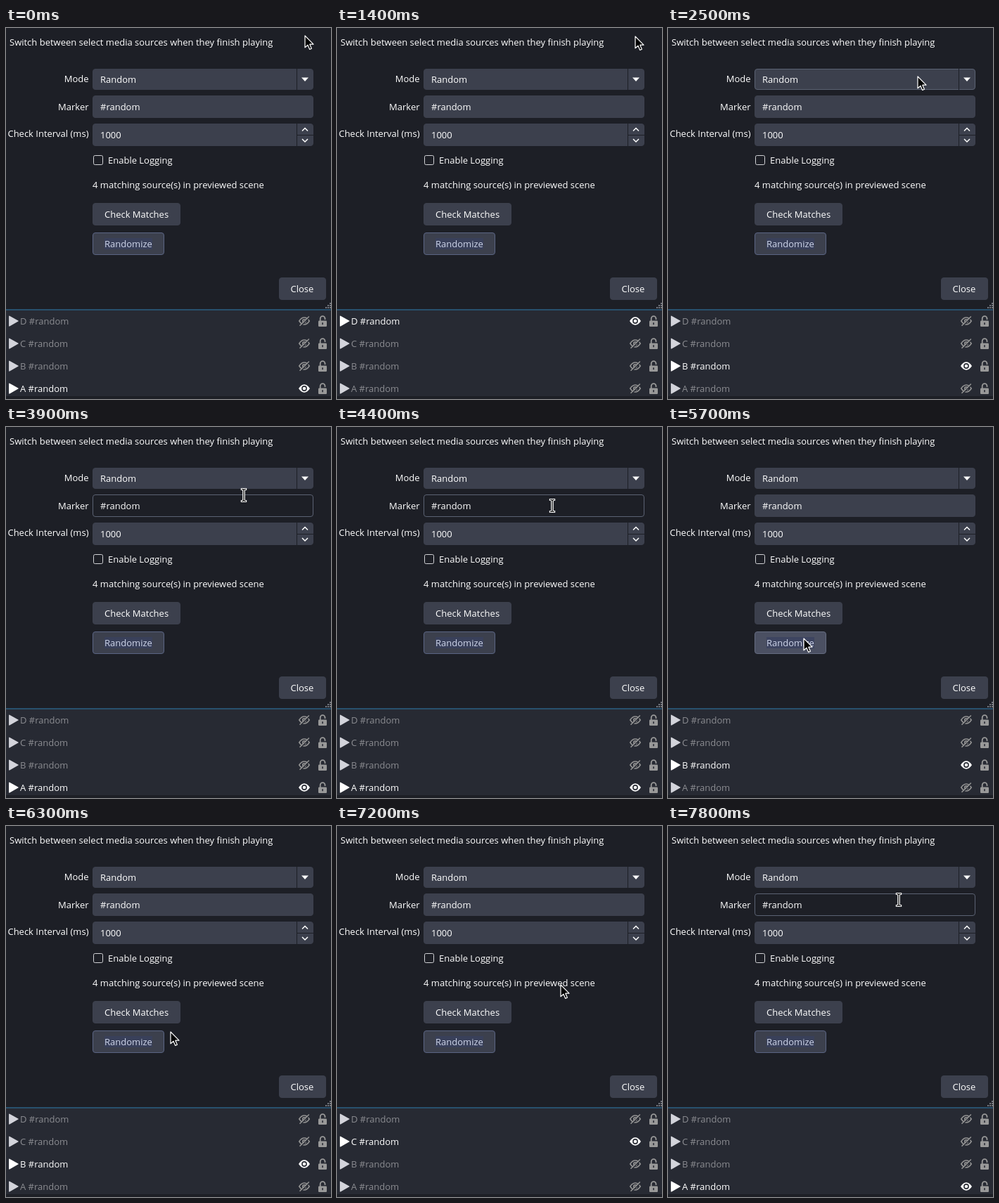
An HTML page that plays this animation: 462x528 px, repeating every 8000 ms.

```html
<!DOCTYPE html>
<html lang="en">
<head>
<meta charset="utf-8">
<title>Media switcher</title>
<style>
html, body { margin: 0; width: 100%; height: 100%; overflow: hidden; background: #1d1f26; }
svg { display: block; width: 462px; height: 528px; }
text { font: 13px "Open Sans", "Noto Sans", sans-serif; fill: #fefefe; white-space: pre; }
.box { fill: #3c404d; stroke: #3c404d; }
.combo.hover { stroke: #5b6273; }
.edit.hover { fill: #1d1f26; stroke: #5b6273; }
.btn.focus { stroke: #5b6584; }
.btn.hover { fill: #4b5062; stroke: #656c80; }
.line { fill: none; stroke: #fefefe; stroke-width: 1.5; }
.row text { fill: #8b8c91; }
.row .play { fill: #d3d4db; stroke: #d3d4db; }
.row.on text { fill: #fefefe; }
.row.on .play { fill: #fff; stroke: #fff; }
.row .open, .row.on .shut { display: none; }
.row.on .open { display: inline; }
</style>
</head>
<body>
<svg id="stage" viewBox="0 0 462 528" xmlns="http://www.w3.org/2000/svg">
  <defs>
    <g id="play"><path d="M4.8 -6.7L17 0L4.8 6.9Z" stroke-width="1.4" stroke-linejoin="round"/></g>
    <g id="eye">
      <path d="M416 0Q419.5 -5.7 424 -5.7T432 0Q428.500 5.7 424 5.7T416 0Z" fill="#fff"/>
      <circle cx="424" r="3.9" fill="#272a33"/>
      <circle cx="424" r="2.300" fill="#fff"/>
    </g>
    <g id="hidden" fill="none" stroke="#929292">
      <path d="M416.800 0Q420 -5 424 -5T431.200 0Q428 5 424 5T416.800 0Z" stroke-width="1.600"/>
      <circle cx="424" r="2.300" stroke-width="1.600"/>
      <path d="M419 7.300L432 -5.700" stroke="#272a33" stroke-width="1.600"/>
      <path d="M417.500 6.800L430.800 -6.500" stroke-width="1.600"/>
    </g>
    <g id="lock">
      <path d="M446.700 1V-3.500a3.400 3.400 0 0 1 6.800 0V-2" fill="none" stroke="#999" stroke-width="1.800"/>
      <rect x="444" y="-.5" width="12" height="8.500" rx="1.200" fill="#999"/>
      <rect x="449.200" y="2.200" width="1.600" height="3" fill="#272a33"/>
    </g>
  </defs>

  <rect width="462" height="528" fill="#1d1f26"/>
  <text x="5" y="25">Switch between select media sources when they finish playing</text>
  <g text-anchor="end">
    <text x="117.500" y="77">Mode</text>
    <text x="117.500" y="117">Marker</text>
    <text x="117.500" y="155">Check Interval (ms)</text>
  </g>

  <g id="fields"></g>

  <path d="M413.500 58V88M413.500 136V168M414 152.500H437" stroke="#1d1f26"/>
  <path d="M420 70.500H430L425 76Z" fill="#fefefe"/>
  <path class="line" d="M421 146.500L425 142.500L429 146.500M421 158L425 162L429 158"/>
  <text x="134" y="78">Random</text>
  <text x="134" y="117">#random</text>
  <text x="134" y="157">1000</text>

  <rect x="124.500" y="181.500" width="13" height="13" rx="2" fill="none" stroke="#d2d3d6"/>
  <text x="145" y="193">Enable Logging</text>
  <text x="123" y="228">4 matching source(s) in previewed scene</text>
  <text x="140" y="270">Check Matches</text>
  <rect x="140" y="299" width="68" height="16" fill="#38405f" opacity=".75"/>
  <text x="140" y="312" style="fill:#d0d7ec">Randomize</text>
  <text x="404.500" y="376">Close</text>

  <path d="M460 392h2M457 395h2M460 395h2M454 398h2M457 398h2M460 398h2" stroke="#777a82" stroke-width="2"/>
  <rect y="402" width="462" height="122" fill="#272a33"/>
  <rect y="400" width="462" height="2" fill="#28506d"/>
  <g id="rows"></g>

  <g id="arrow">
    <path d="M0 0V16.800L4 13.200L6.700 19.400L9.400 18.200L6.800 12.200H12Z" fill="#000" stroke="#fff" stroke-width="1.200" stroke-linejoin="round"/>
  </g>
  <g id="beam" fill="none" stroke-linecap="square">
    <path id="beamPath" d="M-2.500 -8.500Q0 -8.500 0 -7Q0 -8.500 2.500 -8.500M0 -7V7M-2.500 8.500Q0 8.500 0 7Q0 8.500 2.500 8.500" stroke="#fff" stroke-width="3.200"/>
    <use href="#beamPath"/>
    <path d="M-2.500 -8.500Q0 -8.500 0 -7Q0 -8.500 2.500 -8.500M0 -7V7M-2.500 8.500Q0 8.500 0 7Q0 8.500 2.500 8.500" stroke="#000" stroke-width="1.200"/>
  </g>
</svg>
<script>
const LOOP = 8000, STEP = 100;
const $ = id => document.getElementById(id);

function add(parent, name, attrs) {
  const el = document.createElementNS("http://www.w3.org/2000/svg", name);
  for (const key in attrs) el.setAttribute(key, attrs[key]);
  return parent.appendChild(el);
}

// Widgets that react to the pointer: kind, x, y, width, height
const fields = [
  ["combo", 123, 58, 314, 30],
  ["edit", 123, 96, 314, 32],
  ["edit", 123, 136, 314, 32],
  ["btn", 123, 249, 125, 32],
  ["btn focus", 123, 291, 102, 32],
  ["btn", 388, 355, 67, 32]
].map(([kind, x, y, w, h]) => ({
  kind, x, y, w, h,
  el: add($("fields"), "rect", {
    class: "box " + kind, x: x + .5, y: y + .5, width: w - 1, height: h - 1, rx: 3.5
  })
}));

const rows = [..."DCBA"].map((letter, i) => {
  const row = add($("rows"), "g", { class: "row", transform: `translate(0 ${417 + 32 * i})` });
  add(row, "use", { href: "#play", class: "play" });
  add(row, "text", { x: 20, y: 5 }).textContent = letter + " #random";
  add(row, "use", { href: "#eye", class: "open" });
  add(row, "use", { href: "#hidden", class: "shut" });
  add(row, "use", { href: "#lock" });
  return { letter, el: row };
});

// Visible source from each time on
const shows = [
  [0, "A"], [600, "D"], [1600, "B"], [2600, "C"], [3700, "A"],
  [4700, "D"], [5700, "B"], [6700, "C"], [7800, "A"]
];

// Pointer path: time, x, y
const path = [
  [0, 425, 11], [1300, 425, 11], [1400, 424, 12], [1600, 424, 12], [1700, 423, 13],
  [1800, 423, 13], [2500, 355, 69], [2700, 352, 73], [2800, 351, 73], [3000, 351, 74],
  [3500, 351, 74], [3900, 338, 97], [4200, 325, 82], [4300, 325, 82], [4800, 232, 233],
  [5200, 208, 262], [5500, 194, 300], [5600, 194, 300], [5700, 193, 301], [5900, 192, 302],
  [6000, 192, 302], [6800, 304, 278], [7100, 304, 278], [7200, 318, 226], [7500, 328, 105],
  [LOOP, 328, 105]
];

function pointer(t) {
  const i = path.findIndex(p => p[0] > t);
  const [t0, x0, y0] = path[i - 1], [t1, x1, y1] = path[i];
  const k = (t - t0) / (t1 - t0);
  return [Math.round(x0 + (x1 - x0) * k), Math.round(y0 + (y1 - y0) * k)];
}

function draw(time) {
  const t = Math.floor((time % LOOP) / STEP) * STEP;
  const [x, y] = pointer(t);
  let typing = false;
  for (const f of fields) {
    const over = x >= f.x && x < f.x + f.w && y >= f.y && y < f.y + f.h;
    f.el.classList.toggle("hover", over);
    if (over && f.kind === "edit") typing = true;
  }
  for (const id of ["arrow", "beam"]) {
    $(id).setAttribute("transform", `translate(${x} ${y})`);
    $(id).style.display = (id === "beam") === typing ? "" : "none";
  }
  const current = shows.filter(s => s[0] <= t).pop()[1];
  for (const r of rows) r.el.classList.toggle("on", r.letter === current);
}

const start = performance.now();
function tick() {
  draw(performance.now() - start);
  requestAnimationFrame(tick);
}
tick();
</script>
</body>
</html>
```
